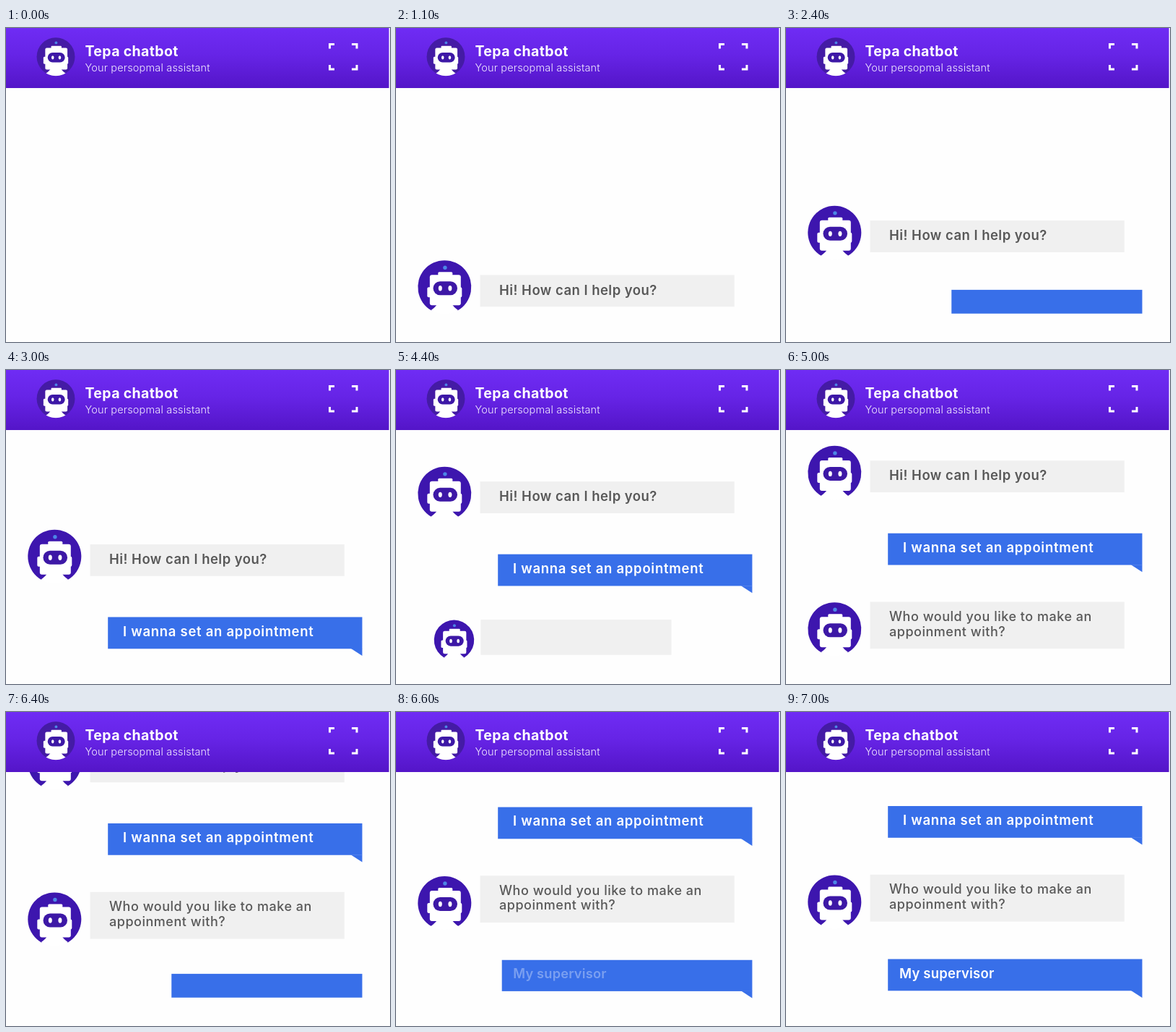
Write an HTML page that moves like this. It is 532x434 px and loops after 8 s.

```html
<!DOCTYPE html>
<html lang="en">
<head>
<meta charset="utf-8">
<title>Chat</title>
<style>
  html, body { margin: 0; width: 100%; height: 100%; overflow: hidden; background: #fefefe; }
  svg { display: block; width: 100vw; height: 100vh; }
  text { font-family: Inter, "Open Sans", sans-serif; }
  .title { font-size: 19.5px; font-weight: 700; fill: #fff; letter-spacing: .35px; }
  .sub { font-size: 14.5px; font-weight: 300; fill: #f0e9ff; letter-spacing: .17px; }
  .msg { font-size: 18.5px; font-weight: 600; }
  .long { font-size: 18px; font-weight: 500; }
</style>
</head>
<body>
<svg viewBox="0 0 532 434" preserveAspectRatio="none">
  <defs>
    <linearGradient id="bar" x2="0" y2="1">
      <stop offset="0" stop-color="#6f2cf4"/>
      <stop offset=".45" stop-color="#6624e6"/>
      <stop offset="1" stop-color="#5415c8"/>
    </linearGradient>
    <clipPath id="disc"><circle r="37"/></clipPath>
    <g id="face">
      <path d="M-10 23H10Q12 27 19 32V38H-19V32Q-12 27 -10 23Z" fill="#fff" clip-path="url(#disc)"/>
      <rect x="-9" y="-21" width="20" height="8" rx="1.5" fill="#fff"/>
      <rect x="-24" y="0" width="48" height="14" rx="2" fill="#fff"/>
      <rect x="-20.5" y="-17" width="43" height="42" rx="3" fill="#fff"/>
      <rect x="-15.8" y="-8" width="33.5" height="19" rx="9.5" fill="#3d18a6"/>
      <ellipse cx="-6" cy="1.5" rx="2.5" ry="3.7" fill="#fff"/>
      <ellipse cx="7.6" cy="1.5" rx="2.5" ry="3.7" fill="#fff"/>
      <circle cx=".6" cy="-27" r="2.7" fill="#4c86e6"/>
    </g>
    <g id="avatar">
      <path d="M-18.5 32A37 37 0 1 1 18.5 32Z" fill="#3d16ae"/>
      <use href="#face"/>
    </g>
  </defs>
  <rect width="532" height="434" fill="#fefefe"/>
  <g id="chat"></g>
  <rect width="530.6" height="83" fill="url(#bar)"/>
  <g transform="translate(69 39.7) scale(.715)">
    <circle r="37" fill="#441ba5"/>
    <use href="#face"/>
  </g>
  <text class="title" x="109.5" y="38.7">Tepa chatbot</text>
  <text class="sub" x="109.5" y="60">Your persopmal assistant</text>
  <path d="M448.5 28.5V22.5H455M479 22.5H486V28.5M448.5 51V57H455M479 57H486V51"
        fill="none" stroke="#fff" stroke-width="3"/>
</svg>
<script>
  const LOOP = 8000, STEP = 100;
  const NS = "http://www.w3.org/2000/svg";

  // push: how far the older messages move up when this one arrives
  const messages = [
    { at: 400, steps: 5, bot: true, top: 341.5, push: 0, x: 143, y: 368.5, gap: .47,
      lines: ["Hi! How can I help you?"] },
    { at: 2400, steps: 7, top: 341.5, push: 100.5, x: 162, y: 367.5, gap: .72,
      lines: ["I wanna set an appointment"] },
    { at: 4400, steps: 7, bot: true, top: 320.5, push: 115.8, x: 143, y: 347, gap: .52, long: true,
      lines: ["Who would you like to make an", "appoinment with?"] },
    { at: 6400, steps: 7, top: 341.5, push: 95.7, x: 157, y: 367.5, gap: .2,
      lines: ["My supervisor"] }
  ];

  function add(parent, tag, attrs, content) {
    const el = document.createElementNS(NS, tag);
    for (const k in attrs) el.setAttribute(k, attrs[k]);
    if (content) el.textContent = content;
    return parent.appendChild(el);
  }

  const chat = document.getElementById("chat");
  for (const m of messages) {
    m.el = add(chat, "g", {});
    if (m.bot) add(m.el, "use", { href: "#avatar", x: 67.3, y: 358.2 });
    add(m.el, "rect", {
      x: m.bot ? 116.5 : 141.2, y: m.top, width: 352.3, height: 385.3 - m.top,
      fill: m.bot ? "#f0f0f0" : "#386fe9"
    });
    if (!m.bot) m.tail = add(m.el, "path", { d: "M478 385H493.5V395Z", fill: "#386fe9" });
    m.label = add(m.el, "g", { fill: m.bot ? "#585858" : "#fff" });
    m.lines.forEach((line, i) => add(m.label, "text", {
      class: m.long ? "long" : "msg", x: m.x, y: m.y + i * 20.7, "letter-spacing": m.gap
    }, line));
    m.origin = m.bot ? [120, 419] : [493.5, 423];
  }

  const ease = n => n < 1 ? 0 : n > 6 ? 1 : 1 - Math.pow(.25, n);

  function render(t) {
    let lift = 0;
    for (const m of [...messages].reverse()) {
      const n = Math.floor((t - m.at) / STEP) + 1;
      const p = ease(n), [ox, oy] = m.origin;
      m.el.setAttribute("visibility", n < 1 ? "hidden" : "visible");
      m.el.setAttribute("transform",
        `translate(${ox} ${oy - lift}) scale(${p}) translate(${-ox} ${-oy})`);
      m.label.setAttribute("opacity", Math.max(0, Math.min(1, (n - 1) / (m.steps - 1))));
      if (m.tail) m.tail.setAttribute("opacity", n > 2 ? 1 : 0);
      lift += m.push * p;
    }
  }

  const start = performance.now();
  function tick() {
    render((performance.now() - start) % LOOP);
    requestAnimationFrame(tick);
  }
  tick();
</script>
</body>
</html>
```
